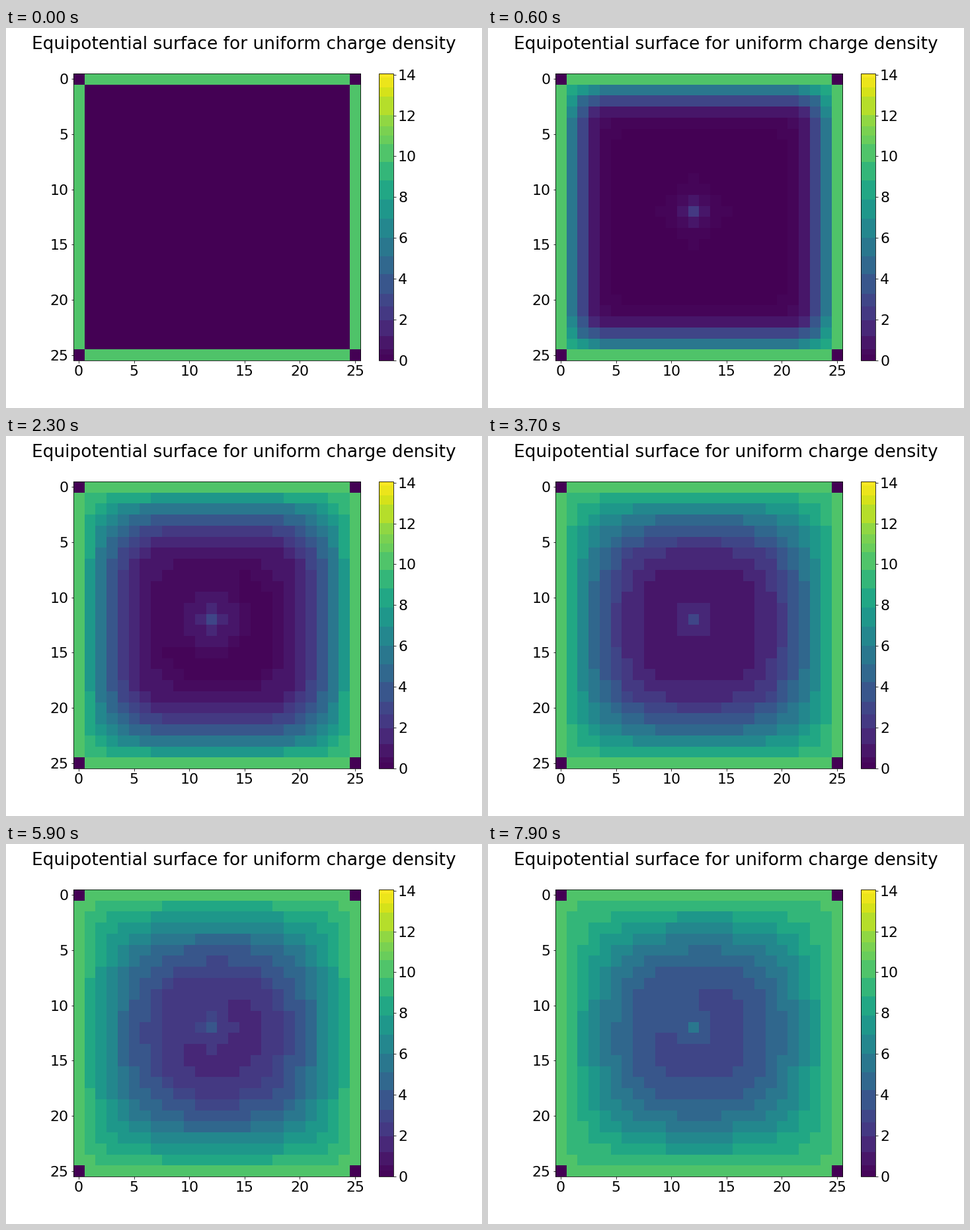
Recreate the animation shown at these times as a matplotlib script. Size 720x576 px, loop 8 s.

```python
import numpy as np
import matplotlib.pyplot as plt
from matplotlib.animation import FuncAnimation
from matplotlib.colors import ListedColormap

SIZE = 26
STEPS = 80
WALL = 10.0
CHARGE = 1.5
CENTRE = (12, 12)
VMAX = 14.05

# Potential values at which the colour steps to the next band
EDGES = [0, 0.04, 0.3, 0.55, 1.2, 1.97, 2.65, 3.27, 4.24, 5.11, 6.02, 6.95,
         7.89, 8.83, 9.73, 10.6, 11.03, 11.45, 12.03, 12.94, 13.39, 13.84,
         VMAX]


def banded_viridis(samples=1024):
    edges = np.array(EDGES)
    mids = (edges[:-1] + edges[1:]) / 2
    values = (np.arange(samples) + 0.5) * VMAX / samples
    band = np.digitize(values, edges) - 1
    return ListedColormap(plt.get_cmap("viridis")(mids[band] / VMAX))


def start_grid():
    grid = np.zeros((SIZE, SIZE))
    grid[0, 1:-1] = grid[-1, 1:-1] = WALL
    grid[1:-1, 0] = grid[1:-1, -1] = WALL
    return grid


def relax(grid):
    """One Jacobi sweep with a point charge near the middle."""
    new = grid.copy()
    new[1:-1, 1:-1] = (grid[:-2, 1:-1] + grid[2:, 1:-1]
                       + grid[1:-1, :-2] + grid[1:-1, 2:]) / 4
    new[CENTRE] += CHARGE
    return new


grids = [start_grid()]
while len(grids) < STEPS:
    grids.append(relax(grids[-1]))

plt.rcParams.update({
    "font.family": "DejaVu Sans",
    "font.size": 22,
    "figure.subplot.bottom": 0.125,
})

fig, ax = plt.subplots(figsize=(10, 8), dpi=72)
fig.suptitle("Equipotential surface for uniform charge density")
image = ax.imshow(grids[0], cmap=banded_viridis(), vmin=0, vmax=VMAX,
                  interpolation="nearest")
ax.set_xticks(range(0, SIZE, 5))
ax.set_yticks(range(0, SIZE, 5))
fig.colorbar(image, ax=ax, ticks=range(0, 15, 2))


def draw(step):
    image.set_data(grids[step])
    return [image]


anim = FuncAnimation(fig, draw, frames=STEPS, interval=100, repeat=True,
                     repeat_delay=0, init_func=lambda: draw(0))
plt.show()
```
